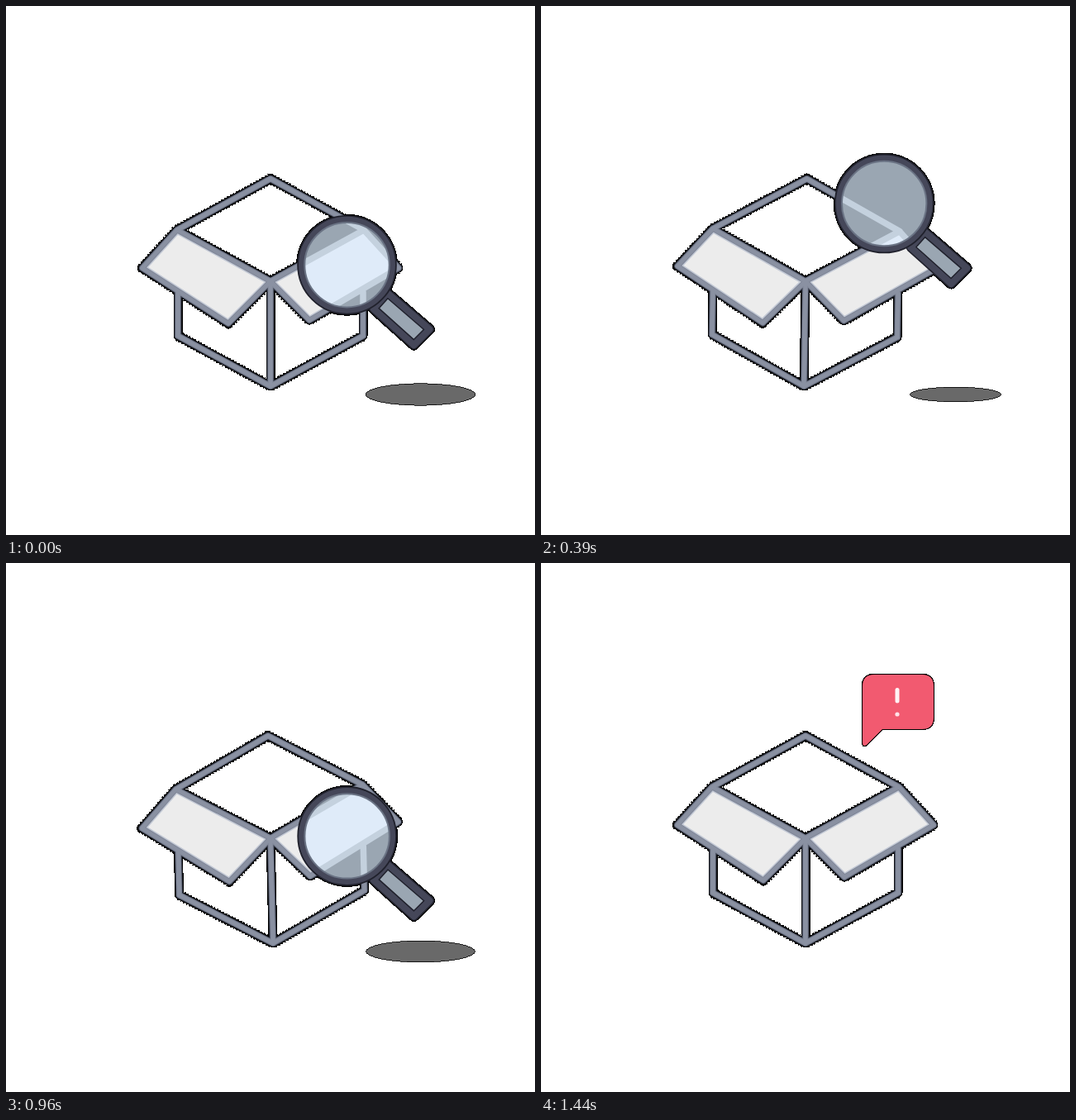
An HTML page for the animation above (2.28 s loop, 640 px wide and 640 px high).

```html
<!DOCTYPE html>
<html lang="en">
<head>
<meta charset="utf-8">
<title>Empty box search</title>
<style>
html, body { margin: 0; width: 100%; height: 100%; overflow: hidden; background: #fff; }
svg { display: block; width: 100vw; height: 100vh; }
path, circle { stroke-linejoin: round; stroke-linecap: round; }
.rim { fill: none; shape-rendering: crispEdges; stroke: #000; }
#matte { shape-rendering: crispEdges; }
</style>
</head>
<body>
<svg id="stage" viewBox="0 0 640 640"></svg>
<script>
const LOOP = 2280, STEP = 30;
const stage = document.getElementById('stage');

const roof = 'M207 271L320 209L433 271';
const flaps = 'M207 271L320 333L269 384L165 317Z M433 271L475 317L367 380L320 333Z';
const posts = 'M208 346V399 M432 346V399 M320 333V460';
const base = 'M208 399L320 460L432 399';
const slopes = `${roof}${flaps}${base}`;
const frame = `${slopes}${posts}`;
const handle = 'M49 34L100 78L81 97L32 53Z';
const bubble = 'M403 135H461Q475 135 475 149V187Q475 201 461 201H413L394 220Q389 223 389 217V149Q389 135 403 135Z';

const line = (d, color, w) => `<path d="${d}" fill="none" stroke="${color}" stroke-width="${w}"/>`;
const ring = (r, color, w) => `<circle r="${r}" fill="none" stroke="${color}" stroke-width="${w}"/>`;

stage.innerHTML = `
  <defs>
    <clipPath id="view">
      <circle class="lensClip" r="53"/>
      <path class="lensClip" d="${handle}"/>
    </clipPath>
    <clipPath id="inside"><path d="${flaps}"/></clipPath>
  </defs>
  <g id="matte">
    <ellipse id="shade" cx="501.5" cy="470" stroke="#000" stroke-width=".8"/>
    <g class="glass">
      <circle r="61.5"/>
      <path d="${handle}" stroke="#000" stroke-width="13"/>
    </g>
  </g>
  <g class="box">
    <path class="rim" d="${slopes}" stroke-width="13" stroke-dasharray="2 2" style="stroke-linecap:butt"/>
    <path class="rim" d="${frame}" stroke-width="11"/>
    ${line(frame, '#3c4150', 8.6)}
    <path d="${flaps}" fill="#ececec" stroke="#c3c9d5" stroke-width="9.5" clip-path="url(#inside)"/>
    ${line(frame, '#7f8697', 6.6)}
    ${line(frame, '#8a91a2', 4.6)}
  </g>
  <g id="search">
    <g class="glass" fill="#9aa6b2">
      <circle r="54"/>
      <path d="${handle}"/>
    </g>
    <g clip-path="url(#view)">
      <g class="box">
        <path d="${flaps}" fill="#dfebf9"/>
        ${line(frame, '#c4d1de', 7.5)}
      </g>
    </g>
    <g class="glass">
      ${line(handle, '#20212c', 11)}
      ${line(handle, '#454759', 8)}
      ${ring(55.8, '#20212c', 9)}
      ${ring(55, '#454759', 7)}
      ${ring(51.2, '#6a7384', 2)}
    </g>
  </g>
  <g id="alert">
    <path d="${bubble}" stroke="#000" stroke-width="2.4" shape-rendering="crispEdges"/>
    <g id="ink">
      <path d="${bubble}" fill="#f25a70"/>
      ${line('M431 153.5V167', '#fff3f5', 5)}
      <circle cx="431" cy="183" r="2.6" fill="#ffe3e8"/>
    </g>
  </g>`;

const all = sel => stage.querySelectorAll(sel);
const set = (el, attrs) => { for (const k in attrs) el.setAttribute(k, attrs[k]); };
const clamp = x => Math.min(1, Math.max(0, x));
const [matte, shade, search, alertBox, ink] =
  ['matte', 'shade', 'search', 'alert', 'ink'].map(id => document.getElementById(id));
const boxes = all('.box'), glasses = all('.glass, .lensClip');

function draw(t) {
  const wave = Math.cos(2 * Math.PI * t / 900);

  // Box wobbles three times, then rests
  const angle = t < 1080 ? 1.65 * Math.sin(2 * Math.PI * t / 360) : 0;
  boxes.forEach(b => set(b, { transform: `rotate(${angle} 320 333)` }));

  // The first rise starts from a lower swing than the later ones
  const swing = t < 450 ? 38.75 : 49.5;
  const x = 413.9 - 1.4 * wave;
  const y = 235.7 + swing * (1 + wave);
  glasses.forEach(g => set(g, { transform: `translate(${x} ${y})` }));

  const seen = clamp((1204 - t) / 124);
  const level = Math.round(105 * seen);
  set(shade, { rx: 60.4 + 5.9 * wave, ry: 10.9 + 2.25 * wave, fill: `rgb(${level},${level},${level})` });
  set(search, { opacity: seen });
  set(matte, { display: seen > 0 ? 'inline' : 'none' });

  const u = clamp((t - 1080) / 360);
  const size = 1 - (1 - u) ** 2;
  set(alertBox, {
    display: u > 0 ? 'inline' : 'none',
    transform: `translate(399 273) scale(${size}) translate(-399 -273)`
  });
  set(ink, { opacity: clamp((t - 1080) / 255) });
}

const start = performance.now();
function tick() {
  const t = (performance.now() - start) % LOOP;
  draw(Math.floor(t / STEP) * STEP);
  requestAnimationFrame(tick);
}
draw(0);
requestAnimationFrame(tick);
</script>
</body>
</html>
```
